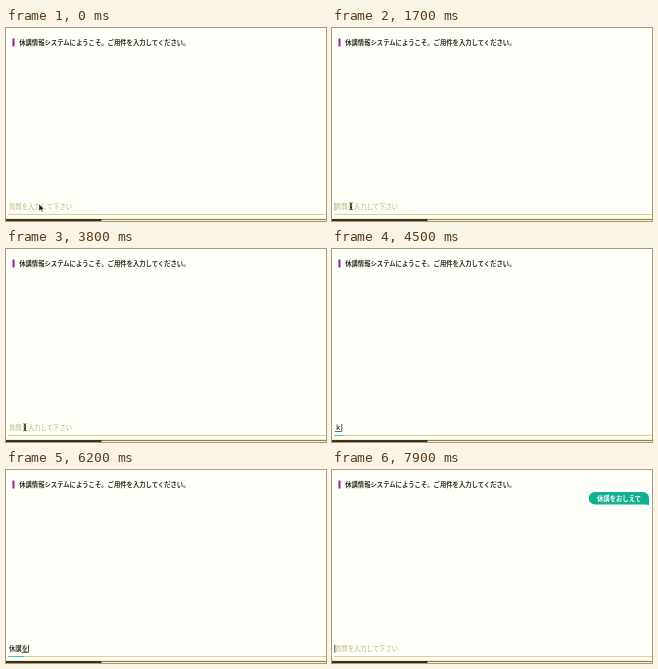
These frames come from a looping animation (320x193 px, 8 s). An HTML page:

```html
<!DOCTYPE html>
<html lang="ja">
<head>
<meta charset="utf-8">
<title>休講情報チャット</title>
<style>
  html, body { margin: 0; width: 100%; height: 100%; overflow: hidden; background: #fffff9; }
  svg { display: block; width: 100vw; height: 100vh; }
  text { font-family: "Noto Sans CJK JP", "Noto Sans CJK", sans-serif; font-size: 6.33px; fill: #1c1c14; white-space: pre; }
  #title, #candidate, #bubble text { font-weight: 700; }
  #title { fill: #2e2e24; }
  #hint { fill: #b8b478; }
  #typed { stroke: #1c1c14; stroke-width: .12; }
  #candidate { font-size: 7.4px; }
  #bubble text { fill: #fff; }
</style>
</head>
<body>
<svg viewBox="0 0 320 193" preserveAspectRatio="none">
  <rect width="320" height="193" fill="#fffff9"/>

  <rect x="6.5" y="10.5" width="2" height="8" fill="#96248f"/>
  <text id="title" x="13.2" y="16.8">休講情報システムにようこそ。ご用件を入力してください。</text>

  <g id="bubble">
    <path d="M263 22H311a6 6 0 0 1 6 6V35.3L314 34.5H263a6.25 6.25 0 0 1 0-12.5z" fill="#12b28e"/>
    <text x="265" y="30.8">休講をおしえて</text>
  </g>

  <rect x="2" y="186" width="318" height="1" fill="#d5d394"/>
  <rect id="focus" x="2.5" y="186" height="1" fill="#3cc8b0"/>
  <rect y="190" width="320" height="3" fill="#f3eec0"/>
  <rect y="191" width="320" height="1" fill="#8c874e"/>
  <rect y="191" width="95.5" height="2" fill="#37331f"/>

  <g id="popup">
    <rect x="-.5" y="181.5" width="79" height="14" fill="#fffffc" stroke="#f0eda8" stroke-width=".8"/>
    <text id="candidate" x="3.1" y="190.3"></text>
  </g>

  <text id="hint" x="3" y="181.4">質問を入力して下さい</text>
  <text id="typed" x="3" y="181.4"></text>
  <rect id="underline" y="182" height=".8" fill="#44443a"/>
  <rect id="caret" y="174.8" width=".9" height="7.8" fill="#44443a"/>

  <path id="arrow" d="M0 0V7L1.7 5.5L2.8 8L4 7.5L2.9 5.1H5.1z" fill="#111" stroke="#fff" stroke-width=".5"/>
  <path id="beam" d="M-1.5-3.5Q0-3.5 0-2.5V2.5Q0 3.5-1.5 3.5M1.5-3.5Q0-3.5 0-2.5V2.5Q0 3.5 1.5 3.5M-1 1.2H1"
    fill="none" stroke="#222218" stroke-width=".9"/>
</svg>
<script>
const LOOP = 8000, EM = 6.33, LEFT = 3;
const FOCUS = 1200, FIRST_KEY = 4400, SENT = 7900;
const ui = {};
document.querySelectorAll("[id]").forEach(el => ui[el.id] = el);

// start time, committed text, text being composed, suggestion
const typing = [
  [0, "", "", ""],
  [FIRST_KEY, "", "ｋ", ""],
  [4800, "", "き", "休講"],
  [4900, "", "きｙ", "休講"],
  [5000, "", "きゅ", "休講"],
  [5100, "", "きゅう", "休講"],
  [5300, "", "きゅうｋ", "休講"],
  [5400, "", "きゅうこ", "休講"],
  [5500, "", "きゅうこう", "休講"],
  [5800, "", "休講", "休講"],
  [6000, "休講", "", ""],
  [6100, "休講", "ｗ", ""],
  [6200, "休講", "を", ""],
  [6400, "休講を", "お", "教えて"],
  [6500, "休講を", "おｓ", "教えて"],
  [6600, "休講を", "おし", "教えて"],
  [6700, "休講を", "おしえ", "教えて"],
  [7000, "休講を", "おしえｔ", "教えて"],
  [7100, "休講を", "おしえて", "教えて"],
  [7500, "休講をおしえて", "", ""],
  [SENT, "", "", ""]
];

const show = (el, amount) => el.setAttribute("opacity", Number(amount));
const move = (el, x, y) => el.setAttribute("transform", `translate(${x} ${y})`);

function caretOpacity(t) {
  if (t >= FIRST_KEY) return 1;
  if (t < FOCUS) return 0;
  const phase = (t - FOCUS) % 1000;
  if (phase < 500) return 1;
  return phase < 600 ? .5 : 0;
}

function focusWidth(t) {
  if (t < FIRST_KEY || t >= SENT) return 0;
  return t < 4800 ? 8.5 : 16;
}

function render(t) {
  const [, done, composing, suggestion] = typing.findLast(step => step[0] <= t);
  const text = done + composing;
  const start = LEFT + done.length * EM;

  ui.typed.textContent = text;
  show(ui.hint, !text);
  ui.underline.setAttribute("x", start);
  ui.underline.setAttribute("width", composing.length * EM);
  ui.caret.setAttribute("x", text ? start + composing.length * EM : 2.4);
  show(ui.caret, caretOpacity(t));

  show(ui.popup, suggestion !== "");
  ui.candidate.textContent = suggestion;
  move(ui.popup, start - LEFT, 0);

  ui.focus.setAttribute("width", focusWidth(t));
  show(ui.bubble, t >= SENT);

  const glide = Math.min(1, Math.floor(t / 100) / 2);
  const x = 33 - 14 * glide;
  show(ui.arrow, t < 200);
  show(ui.beam, t >= 200 && t < FIRST_KEY);
  move(ui.arrow, x, 176);
  move(ui.beam, x, 178.3);
}

function frame(now) {
  render(now % LOOP);
  requestAnimationFrame(frame);
}
render(0);
requestAnimationFrame(frame);
</script>
</body>
</html>
```
